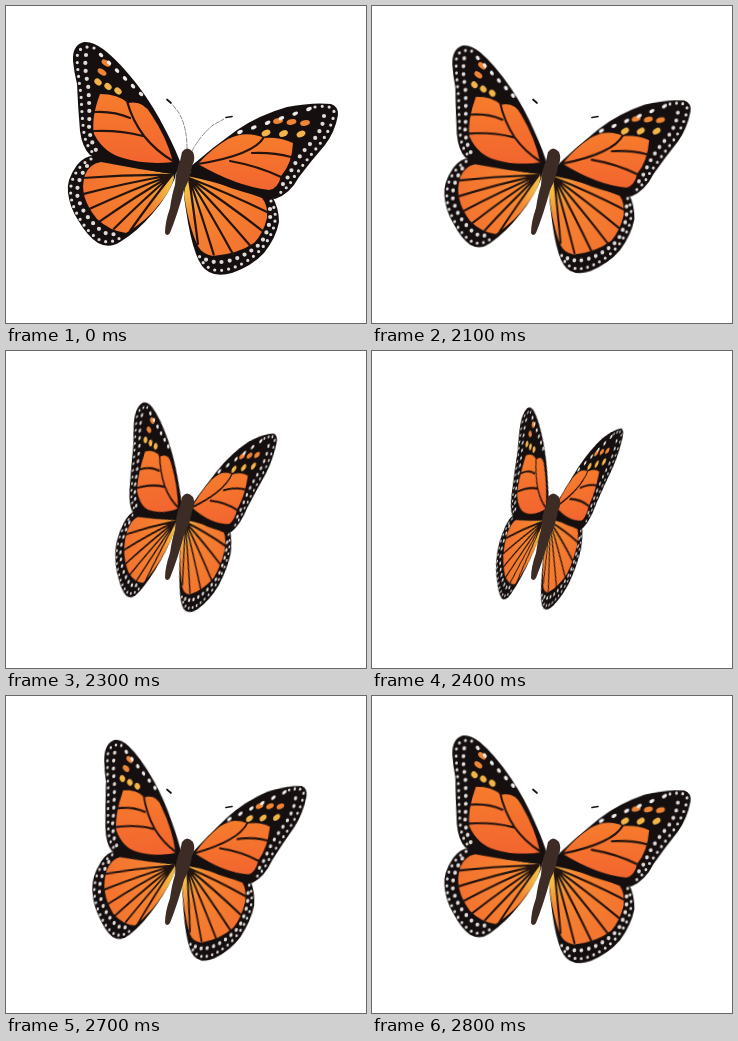
An HTML page that plays this animation: 360 by 317 pixels, repeating every 2900 ms.

```html
<!DOCTYPE html>
<html lang="en">
<head>
<meta charset="utf-8">
<title>Butterfly</title>
<style>
  html, body { margin: 0; width: 100%; height: 100%; overflow: hidden; background: #fff; }
  svg { display: block; width: 100%; height: 100%; }
  .black { fill: #15100f; }
  .vein { fill: none; stroke: #24140f; stroke-width: 2.2; stroke-linecap: round; }
  .rim { fill: none; stroke: #dedbd9; stroke-linecap: round; }
  .outer { stroke-width: 3.2; stroke-dasharray: 0 7; }
  .inner { stroke-width: 4.2; stroke-dasharray: 0 8; }
  .feeler { fill: none; stroke: #8d8a88; stroke-dasharray: 5 1; }
  .club { fill: none; stroke: #191414; stroke-width: 1.7; stroke-linecap: round; }
</style>
</head>
<body>
<svg viewBox="0 0 360 317">
  <defs>
    <radialGradient id="hind" gradientUnits="userSpaceOnUse" cx="174" cy="180" r="95">
      <stop offset="0" stop-color="#f5d44b"/>
      <stop offset=".16" stop-color="#f3b040"/>
      <stop offset=".36" stop-color="#f58431"/>
      <stop offset="1" stop-color="#f3722e"/>
    </radialGradient>
    <linearGradient id="fore" x2="0" y2="1">
      <stop offset="0" stop-color="#f67c2c"/>
      <stop offset="1" stop-color="#f2652f"/>
    </linearGradient>
  </defs>

  <g id="wings">
    <!-- left hindwing -->
    <path class="black" d="M170 166 L92 150 Q80 148 71 159 Q60 174 62 187 Q64 202 72 214 Q82 231 92 237 Q103 243 114 236 Q131 226 147 207 Q161 191 169 172Z"/>
    <path fill="url(#hind)" d="M167 168 Q130 163 95 156 Q83 158 79 169 Q72 190 91 213 Q104 225 120 227 Q142 214 155 196 Q165 184 168 172Z"/>
    <path class="rim outer" d="M85 153 Q72 159 66 175 Q62 190 70 206 Q81 227 94 234 Q105 239 117 230"/>
    <path class="rim inner" d="M81 160 Q71 174 71 188 Q75 206 89 219 Q99 230 109 228"/>

    <!-- right hindwing -->
    <path class="black" d="M180 168 Q176 184 180 204 Q184 232 190 248 Q195 262 203 266 Q212 271 226 267 Q246 260 258 247 Q270 232 273 216 Q273 202 266 190 Q230 184 186 166Z"/>
    <path fill="url(#hind)" d="M181 170 Q213 176 256 192 Q262 199 261 212 Q257 228 248 237 Q232 248 207 250 Q196 248 192 240 Q183 222 178 188Z"/>
    <path class="rim outer" d="M265 195 Q273 209 266 226 Q258 244 241 255 Q219 268 205 263 Q196 258 193 249"/>
    <path class="rim inner" d="M264 203 Q266 219 255 237 Q239 251 222 255 Q208 258 199 253"/>
    <g id="fans"></g>

    <!-- left forewing -->
    <path class="black" d="M78 36 Q66 39 67 55 Q68 66 71 78 Q72 102 74 125 Q76 141 84 149 Q99 156 119 158 Q146 166 169 168 L176 161 Q170 144 160 125 Q148 101 133 81 Q113 55 97 43 Q86 35 78 36Z"/>
    <path fill="url(#fore)" d="M94 88 Q112 88 122 97 Q137 94 145 108 Q161 132 167 156 Q140 159 117 152 Q98 147 88 128 Q85 112 94 88Z"/>
    <path class="vein" d="M121 95 Q126 114 138 130 Q150 145 167 155 M89 106 Q108 105 124 112 M88 125 Q114 124 137 130"/>
    <path class="rim outer" d="M88 42 Q72 38 71 52 Q72 70 75 88 Q76 113 78 127 Q80 140 88 148"/>
    <path class="rim inner" d="M80 49 Q78 63 82 78 Q84 103 83 122 Q85 138 92 147"/>

    <!-- right forewing -->
    <path class="black" d="M184 161 Q207 141 231 124 Q253 109 281 101 Q307 96 325 98 Q333 101 332 109 Q329 126 319 139 Q305 155 293 171 Q284 188 269 193 Q235 187 212 177 Q194 171 184 166Z"/>
    <path fill="url(#fore)" d="M192 158 Q205 143 222 133 Q240 124 258 132 Q274 131 287 137 Q286 158 275 170 Q272 183 263 184 Q230 180 192 158Z"/>
    <path class="vein" d="M258 131 Q248 149 192 158 M246 147 Q266 146 285 151 M224 155 Q252 160 275 171"/>
    <path class="rim outer" d="M309 101 Q330 98 328 109 Q324 125 313 139 Q299 156 288 171 Q281 184 270 189"/>
    <path class="rim inner" d="M318 110 Q317 123 306 136 Q294 148 286 163 Q280 176 274 181"/>
    <g id="spots"></g>
  </g>

  <g id="feelers">
    <path class="feeler" d="M181 143 Q181 121 173 107 L166 98 M186 145 Q194 130 207 119 L218 113"/>
  </g>
  <g id="clubs">
    <path class="club" d="M161 93.5 L165 97 M220 111.5 L226 110.5"/>
  </g>
  <path fill="#3d2b26" d="M176 146 Q181 139 187 146 Q190 153 186 160 Q184 173 178 184 Q172 207 164 227 Q161 231 159 227 Q159 216 164 202 Q166 188 169 179 Q170 162 174 155Z"/>
</svg>
<script>
  const $ = id => document.getElementById(id);
  const SVG = 'http://www.w3.org/2000/svg';
  const mix = (a, b, t) => a + (b - a) * t;

  // Veins spread from the wing root to even points along its margin
  const fan = (x, y, margin, n) => {
    const edge = document.createElementNS(SVG, 'path');
    edge.setAttribute('d', margin);
    const size = edge.getTotalLength();
    let d = '';
    for (let i = 0; i < n; i++) {
      const p = edge.getPointAtLength(size * i / (n - 1));
      d += `M${x} ${y} Q${mix(x, p.x, .5)} ${mix(y, p.y, .5) - 2} ${p.x} ${p.y}`;
    }
    return `<path class="vein" d="${d}"/>`;
  };
  $('fans').innerHTML =
    fan(166, 169, 'M77 172 Q72 190 90 213 Q104 225 124 225', 6) +
    fan(183, 172, 'M261 206 Q260 232 235 246 Q205 256 192 238', 6);

  // Even row of spots from one point to another
  const row = (fill, n, x1, y1, x2, y2, rx, ry, turn) =>
    Array.from({ length: n }, (_, i) => {
      const t = i / (n - 1);
      return `<ellipse rx="${rx}" ry="${ry}" fill="${fill}"
        transform="translate(${mix(x1, x2, t)} ${mix(y1, y2, t)}) rotate(${turn})"/>`;
    }).join('');
  const ORANGE = '#ef8434', YELLOW = '#f3b548', WHITE = '#eeebe8';
  $('spots').innerHTML =
    row(ORANGE, 2, 100, 57, 96, 66, 5, 2.7, 35) +
    row(YELLOW, 3, 92, 76, 112, 85, 4, 3, 40) +
    row(WHITE, 6, 95, 49, 135, 88, 2.6, 1.8, 45) +
    row(ORANGE, 3, 272, 115, 299, 117, 5, 2.7, -12) +
    row(YELLOW, 3, 260, 127, 295, 128, 4.6, 3, -25) +
    row(WHITE, 6, 234, 126, 303, 103, 3, 1.8, -25);

  // Squeeze the wings toward the body axis
  const fold = k => {
    const cx = 175, cy = 170, ux = .965, uy = .262, m = k - 1;
    const a = 1 + m * ux * ux, b = m * ux * uy, d = 1 + m * uy * uy;
    const e = cx - a * cx - b * cy, f = cy - b * cx - d * cy;
    return `matrix(${[a, b, b, d, e, f].map(v => v.toFixed(5))})`;
  };

  // Rest open, then close and reopen through the same poses
  const LOOP = 2900, REST = 2100, BEAT = 100;
  const spread = [1, .897, .759, .53, .377];
  const steps = [[0, 1]];
  for (let i = 0; i < 8; i++) steps.push([REST + i * BEAT, spread[Math.min(i + 1, 8 - i)]]);
  steps.push([LOOP, 1]);

  const play = (id, style) => $(id).animate(
    steps.map(([t, k]) => ({ offset: t / LOOP, easing: 'step-end', ...style(k) })),
    { duration: LOOP, iterations: Infinity });

  play('wings', k => ({ transform: fold(k) }));
  play('feelers', k => ({ opacity: k === 1 ? 1 : 0 }));
  play('clubs', k => ({ opacity: k > .7 ? 1 : 0 }));
</script>
</body>
</html>
```
